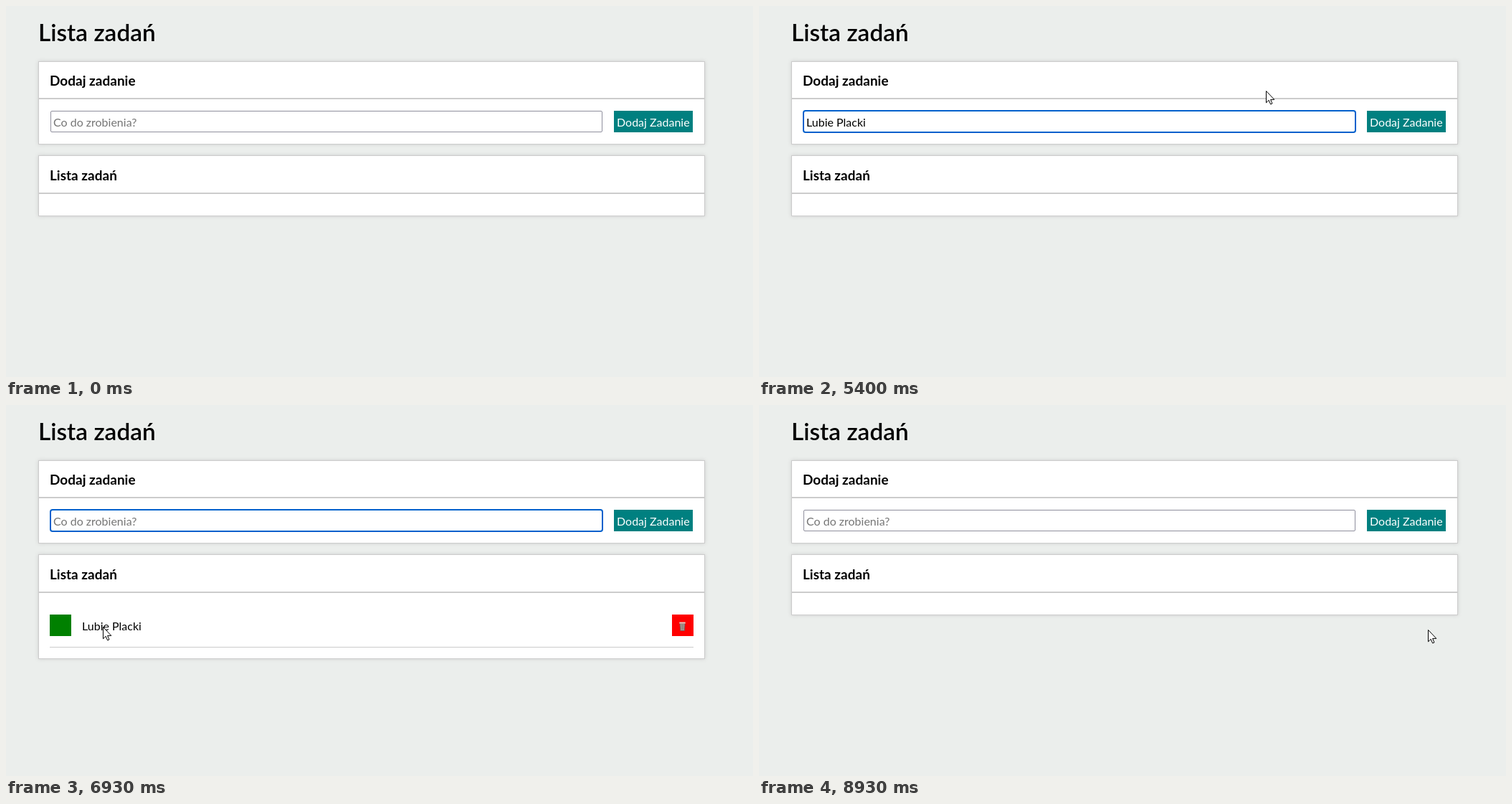
An HTML page that plays this animation: 1042 px wide and 517 px high, repeating every 9.99 s.

```html
<!DOCTYPE html>
<html lang="pl">
<head>
<meta charset="utf-8">
<title>Lista zadań</title>
<style>
  html, body { margin: 0; width: 100%; height: 100%; overflow: hidden; background: #ebeeec; }
  body { position: relative; font: 16px Lato, sans-serif; color: #000; cursor: default; }
  body * { position: absolute; box-sizing: border-box; margin: 0; white-space: pre; }
  h1 { left: 45px; top: 16px; font-size: 33.4px; font-weight: 600; line-height: normal; }
  h2 { left: 15px; top: 14px; font-size: 19px; line-height: normal; }
  section { left: 45px; width: 930px; background: #fff; border: 1px solid #ccc; box-shadow: 0 0 5px #ccc; }
  hr { left: 0; top: 50px; width: 928px; height: 2px; border: 0; background: #ccc; }
  #add { top: 77px; height: 116px; }
  #list { top: 208px; }
  #list h2 { top: 15px; }
  #list hr { top: 51px; }
  #field { left: 62px; top: 146px; width: 770px; height: 30px; border: 1px solid #8f8f9d; border-radius: 2px; }
  #field.focus { left: 61px; top: 145px; width: 772px; height: 32px; border: 2px solid #0060cc; border-radius: 4px; }
  #hint, #typed { left: 66px; top: 152px; }
  #hint { color: #757575; }
  #text { position: static; }
  #caret { left: 100%; top: 0; width: 1px; height: 19px; background: #000; }
  #button { left: 848px; top: 146px; width: 110px; height: 30px; color: #fff; }
  #button span { left: 4px; top: 6px; }
  #done, #remove { top: 292px; width: 30px; height: 30px; }
  #done { left: 61px; }
  #remove { left: 929px; }
  #task { left: 106px; top: 298px; }
  #rule { left: 61px; top: 337px; width: 898px; height: 1px; background: #ccc; }
  svg { left: 0; top: 0; overflow: visible; }
</style>
</head>
<body>
<h1>Lista zadań</h1>
<section id="add"><h2>Dodaj zadanie</h2><hr></section>
<section id="list"><h2>Lista zadań</h2><hr></section>
<div id="field"></div>
<span id="hint">Co do zrobienia?</span>
<span id="typed"><span id="text"></span><i id="caret"></i></span>
<div id="button"><span>Dodaj Zadanie</span></div>
<div id="item">
  <div id="done">
    <svg width="30" height="30"><path id="tick" fill="#fff" d="M9.5 17.5 L12 16 L14 18.8 Q16.5 13 20 10 L21.5 10 Q17 15.5 14.5 22.5 H12.6 Z"/></svg>
  </div>
  <span id="task">Lubie Placki</span>
  <div id="remove">
    <svg width="30" height="30">
      <path d="M11 13 H18 L17.4 22.5 H11.8 Z" fill="#b8aaa0" stroke="#655" stroke-width=".7"/>
      <path d="M13 14 V21.5 M14.6 14 V21.5 M16.2 14 V21.5" stroke="#756560" stroke-width=".7"/>
      <path d="M10.3 11.6 H18.7" stroke="#ddd3c8" stroke-width="2"/>
    </svg>
  </div>
  <div id="rule"></div>
</div>
<svg width="1042" height="517">
  <g id="cursor">
    <path id="arrow" d="M.5 .5 V16.8 L4.2 13.3 L6.6 18.9 L9 17.9 L6.6 12.4 H11.8 Z" fill="#fff" stroke="#000"/>
    <path id="beam" d="M.5 -6 V6.5 M-3 -7.5 H0 M1 -7.5 H4 M-3 7.5 H0 M1 7.5 H4" fill="none" stroke="#1a3c5c"/>
  </g>
</svg>
<script>
const LOOP = 9990, BLINK = 530, STEP = 70;
const FOCUS = 930, TYPE = 2130, MOVE = 5120, PRESS_ADD = 6030, ADDED = 6160;
const PRESS_DONE = 7210, DONE = 7280, PRESS_REMOVE = 8600, REMOVED = 8670;

const el = id => document.getElementById(id);
const within = (t, from, to) => t >= from && t < to;
const show = (id, on) => { el(id).style.display = on ? "" : "none"; };
const smooth = u => u * u * (3 - 2 * u);

// Each word is typed at an even pace.
const words = [
  { text: "Lubie ", start: TYPE, pace: 162 },
  { text: "Placki", start: 3670, pace: 172 }
];
const strokes = words.flatMap(({ text, start, pace }) =>
  [...text].map((char, i) => ({ char, time: start + i * pace })));
const caretResets = [FOCUS, ...strokes.map(s => s.time), ADDED];

// Pointer moves: Bézier control points, advanced in steps of STEP ms.
const entry = [363, 427], field = [254, 159], add = [891, 158], check = [76, 306], bin = [934, 320], rest = [940, 316];
const moves = [
  { start: 320, time: 490, points: [entry, [280, 220], field] },
  { start: MOVE, time: 560, points: [field, [540, 190], [964, 20], add] },
  { start: ADDED, time: 980, points: [add, [720, 210], [200, 330], check] },
  { start: 7270, time: 920, points: [check, [300, 345], [800, 337], bin] },
  { start: 8260, time: 140, points: [bin, rest] },
  { start: 8860, time: 70, points: [rest, [933, 313]] }
];

function bezier(points, u) {
  if (points.length === 1) return points[0];
  const mix = (a, b) => a.map((v, i) => v + (b[i] - v) * u);
  return bezier(points.slice(1).map((p, i) => mix(points[i], p)), u);
}

function pointerAt(t) {
  const { start, time, points } = moves.findLast(m => m.start <= t) ?? moves[0];
  const elapsed = Math.max(0, Math.floor((t - start) / STEP) * STEP);
  return bezier(points, smooth(Math.min(1, elapsed / time))).map(Math.round);
}

function render(t) {
  const [x, y] = pointerAt(t);
  const visible = within(t, moves[0].start, TYPE) || t >= MOVE;
  const over = (left, top, w, h) => visible && within(x, left, left + w) && within(y, top, top + h);
  const paint = (id, hue, light, hover, pressed) => {
    el(id).style.background = `hsl(${hue},100%,${light + (pressed ? 10 : hover ? 5 : 0)}%)`;
  };

  const focused = within(t, FOCUS, PRESS_ADD) || within(t, ADDED, PRESS_DONE);
  const typed = t < ADDED ? strokes.filter(s => s.time <= t).map(s => s.char).join("") : "";
  const reset = caretResets.findLast(r => r <= t) ?? 0;
  el("field").className = focused ? "focus" : "";
  el("text").textContent = typed;
  show("hint", !typed);
  show("caret", focused && Math.floor((t - reset) / BLINK) % 2 === 0);

  const listed = within(t, ADDED, REMOVED), done = t >= DONE;
  show("item", listed);
  show("tick", done);
  el("task").style.textDecoration = done ? "line-through" : "none";
  el("list").style.height = (listed ? 146 : 85) + "px";

  paint("button", 180, 25, over(848, 146, 110, 30), within(t, PRESS_ADD, ADDED));
  paint("done", 120, 25, over(61, 292, 30, 30), within(t, PRESS_DONE, DONE));
  paint("remove", 0, 50, over(929, 292, 30, 30), within(t, PRESS_REMOVE, REMOVED));

  const beam = over(62, 146, 770, 30);
  show("cursor", visible);
  show("beam", beam);
  show("arrow", !beam);
  el("cursor").setAttribute("transform", `translate(${x} ${y})`);
}

const began = performance.now();
function tick() {
  render((performance.now() - began) % LOOP);
  requestAnimationFrame(tick);
}
tick();
</script>
</body>
</html>
```
